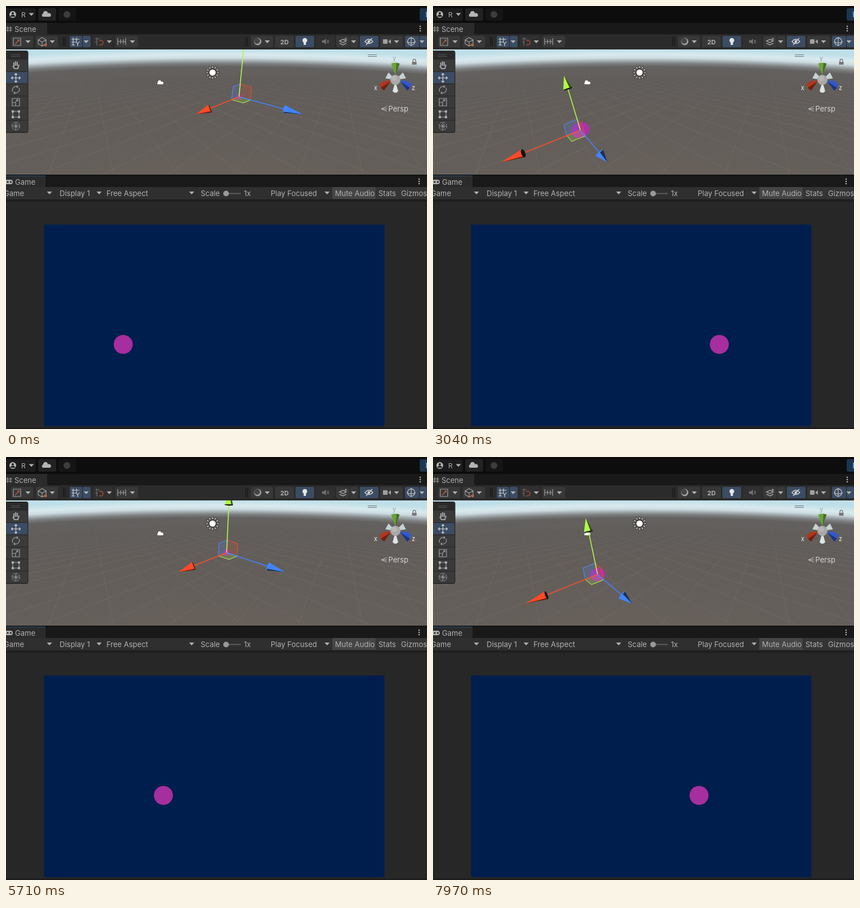
Recreate the animation shown at these times as an HTML page. Size 746 px wide and 750 px high, loop 8 s.

```html
<!DOCTYPE html>
<html lang="en">
<head>
<meta charset="utf-8">
<title>Oscillating disc</title>
<style>
  html, body { margin: 0; width: 100%; height: 100%; overflow: hidden; background: #272727; }
  svg { display: block; width: 746px; height: 750px; }
  text { font: 13px Inter, "Open Sans", sans-serif; fill: #b0b0b0; }
</style>
</head>
<body>
<svg id="stage" viewBox="0 0 746 750" xmlns="http://www.w3.org/2000/svg">
  <defs>
    <!-- curved horizon: a wide ellipse of ground under the sky -->
    <radialGradient id="sky" gradientUnits="userSpaceOnUse" cx="0" cy="0" r="1"
      gradientTransform="translate(373 300) scale(1200 230)">
      <stop offset="0" stop-color="#67605b"/>
      <stop offset=".74" stop-color="#605c59"/>
      <stop offset=".835" stop-color="#636160"/>
      <stop offset=".861" stop-color="#7b7d7e"/>
      <stop offset=".883" stop-color="#a3adb1"/>
      <stop offset=".904" stop-color="#cddce1"/>
      <stop offset=".93" stop-color="#d9eaee"/>
      <stop offset=".97" stop-color="#bfdfe8"/>
    </radialGradient>
    <linearGradient id="fade" x1="0" y1="92" x2="0" y2="190" gradientUnits="userSpaceOnUse">
      <stop offset=".1" stop-color="#000"/>
      <stop offset="1" stop-color="#fff"/>
    </linearGradient>
    <linearGradient id="shadow" x1="0" y1="0" x2="0" y2="1">
      <stop offset="0" stop-color="#1a1a1a"/>
      <stop offset="1" stop-color="#272727"/>
    </linearGradient>
    <mask id="far"><rect y="77" width="746" height="223" fill="url(#fade)"/></mask>
    <clipPath id="view"><rect y="77" width="746" height="222"/></clipPath>
  </defs>
  <g id="ui"></g>
  <g clip-path="url(#view)">
    <rect y="77" width="746" height="222" fill="url(#sky)"/>
    <path id="grid" mask="url(#far)" stroke="#98938e" stroke-opacity=".19" fill="none"/>
    <g id="icons"></g>
    <g id="gizmo"></g>
    <g id="overlay"></g>
  </g>
  <circle id="ball" cy="600" r="16.8" fill="#a62e9e"/>
</svg>
<script>
const GREY = '#a0a0a0', ACTIVE = '#3b4c63';
const el = id => document.getElementById(id);
const rect = (x, y, w, h, fill, r = 0) =>
  `<rect x="${x}" y="${y}" width="${w}" height="${h}" rx="${r}" fill="${fill}"/>`;
const text = (x, y, s, more = '') => `<text x="${x}" y="${y}" ${more}>${s}</text>`;
const disc = (x, y, r, fill) => `<circle cx="${x}" cy="${y}" r="${r}" fill="${fill}"/>`;
const line = (d, color = GREY, w = 1.2, fill = 'none') =>
  `<path d="${d}" fill="${fill}" stroke="${color}" stroke-width="${w}"/>`;
const shape = (d, fill) => `<path d="${d}" fill="${fill}"/>`;
const caret = (x, y) => shape(`M${x - 4.5} ${y - 2.5}h9l-4.5 5z`, '#b0b0b0');
const dots = (x, y) => [-4, 0, 4].map(d => disc(x, y + d, 1.3, '#b0b0b0')).join('');
const cloud = (x, y, s, c = '#b4b4b4') => shape(
  `M${x - 7 * s} ${y + 4 * s}a3.4 3.4 0 0 1 ${s} ${-6 * s}a${4 * s} ${4 * s} 0 0 1 ${8 * s} 0a${3 * s} ${3 * s} 0 0 1 ${s * 4} ${6 * s}z`, c);
const rays = (x, y, a, b, n, color, w) => line(Array.from({ length: n }, (_, i) => {
  const c = Math.cos(i * 2 * Math.PI / n), s = Math.sin(i * 2 * Math.PI / n);
  return `M${x + a * c} ${y + a * s}L${x + b * c} ${y + b * s}`;
}).join(''), color, w);

function drawPanels() {
  const button = ([x, w, fill = '#383838']) => rect(x, 53, w, 20, fill, 2);
  el('ui').innerHTML = [
    rect(0, 0, 746, 750, '#272727'),
    // top bar
    rect(0, 0, 746, 30, '#0d0d0d'),
    rect(-4, 4, 57, 22, '#1c1c1c', 3), rect(57, 4, 32, 22, '#222', 3), rect(93, 4, 31, 22, '#151515', 3),
    disc(12, 15, 6, '#b4b4b4'), disc(12, 13, 2, '#1c1c1c'), shape('M8 19a4 3.5 0 0 1 8 0z', '#1c1c1c'),
    text(27, 19.5, 'R', 'style="font-size:12px"'), caret(45, 15), cloud(72, 15, 1), disc(108, 15, 6, '#3d3d3d'),
    rect(733, 4, 14, 22, '#1d3550', 3), rect(744, 10, 2, 10, '#4c9be0'),
    // scene tab
    rect(0, 30, 746, 20, '#191919'), rect(0, 30, 73, 20, '#2b2b2b'),
    line('M3 36v10M8 36v10M0 39h11M0 43h11', GREY, 1.1), text(15, 45.5, 'Scene'), dots(734, 40),
    rect(0, 50, 746, 27, '#2b2b2b'),
    [[9, 39], [53, 39], [113, 22, ACTIVE], [136, 14, ACTIVE], [154, 34, '#303030'], [194, 40],
     [434, 39], [477, 33], [513, 33, ACTIVE], [549, 33, '#303030'], [585, 24], [610, 14],
     [627, 33, ACTIVE], [663, 40], [707, 25, ACTIVE], [733, 20, ACTIVE]].map(button).join(''),
    [39, 82, 142, 183, 224, 463, 616, 692, 737].map(x => caret(x, 63.5)).join(''),
    line('M102 55v16M105 55v16M425 55v16M428 55v16', '#151515', 1.2),
    line('M13 57h13v13h-13z'), line('M16 68l7-8M20 60h3v3', '#c0603f'),
    line('M57 60l7-4 7 4v7l-7 4-7-4zM57 60l7 4 7-4M64 64v7'), disc(70, 69, 2.5, '#c0603f'),
    line('M116 59h14M116 64h8M116 69h6M119 56v14M125 56v7M124 63l3 4 3-4M127 67v4', '#d0d0d0'),
    line('M158 58h8M158 64h4M161 56v14', '#707070'), line('M165 61h3a3.5 3.5 0 0 1 0 8h-3', '#8a4636', 2),
    line('M198 57v12M212 57v12M198 63h14M203 59v8M208 59v8'),
    disc(446, 63, 6.5, GREY), disc(445, 62, 5, '#444'),
    text(486, 67.5, '2D', 'style="font-size:11px;font-weight:700"'),
    disc(529.5, 61, 4.2, '#e6e6e6'), rect(527.5, 64, 4, 5, '#e6e6e6'),
    shape('M560 61h3l4-3v10l-4-3h-3z', '#707070'), line('M569 60l3 6M572 60l-3 6', '#707070'),
    line('M591 62l6-3 6 3-6 3zM591 66l6 3 6-3', GREY, 1.5), line('M602 56v5M599.5 58.5h5'),
    line('M636 63q7-8 14 0q-7 7-14 0zM638 69l11-12', '#d0d0d0', 1.5), disc(643, 63, 2.4, '#d0d0d0'),
    rect(668, 59, 8, 8, GREY, 1), shape('M677 63l5-4v8z', GREY),
    '<circle cx="718" cy="63" r="6.5" fill="none" stroke="#c0c0c0" stroke-width="1.3"/>',
    line('M718 55v16M710 63q8 5 16 0', '#c0c0c0'),
    // game tab and toolbar
    rect(0, 299, 746, 2, '#111'), rect(0, 301, 746, 20, '#191919'),
    rect(0, 301, 70, 20, '#2b2b2b'), rect(0, 300.5, 70, 1.5, '#28435a'),
    rect(-2, 308, 14, 8, '#b0b0b0', 4), disc(3, 312, 1.7, '#2b2b2b'), disc(8.5, 312, 1.7, '#2b2b2b'),
    text(16, 316.5, 'Game'), dots(732, 311),
    rect(0, 321, 746, 22, '#2f2f2f'), rect(0, 343, 746, 6, 'url(#shadow)'),
    [87, 171, 338, 577].map(x => rect(x, 321, 1, 22, '#292929')).join(''),
    rect(578, 321, 77, 21, '#454545'), rect(656, 321, 40, 21, '#353535'), rect(697, 321, 49, 21, '#353535'),
    [[-4, 'Game'], [95, 'Display 1'], [178, 'Free Aspect'], [345, 'Scale'], [421.5, '1x'],
     [469, 'Play Focused'], [583, 'Mute Audio'], [660, 'Stats'], [700, 'Gizmos']]
      .map(([x, s]) => text(x, 336.5, s)).join(''),
    [77, 165, 329, 569].map(x => caret(x, 331.5)).join(''),
    rect(385, 331.5, 31, 2, '#5e5e5e'), disc(390, 332.5, 5, '#999'),
    rect(67.5, 387.5, 603, 357.5, '#001e4d', 1), rect(0, 747.5, 746, 2.5, '#1c1c1c')
  ].join('');
}

function drawScene() {
  let d = '';
  for (let i = -24; i <= 24; i++)
    for (const vx of [592, 150]) d += `M${vx} 91L${vx + i * 115 + 40} 299`;
  el('grid').setAttribute('d', d);
  el('icons').innerHTML = disc(366, 118, 7, '#33302e') + disc(366, 118, 5.6, '#fff') +
    rays(366, 118, 7.5, 12.5, 12, '#33302e', 2.8) + rays(366, 118, 8, 11.5, 12, '#fff', 1.2) +
    cloud(273.5, 136, .7, '#fff');

  const lobe = (dx, dy, fill) => {
    const n = Math.hypot(dx, dy), px = -dy / n * 6, py = dx / n * 6;
    return shape(`M690 131L${690 + dx + px} ${131 + dy + py}L${690 + dx - px} ${131 + dy - py}z`, fill);
  };
  el('overlay').innerHTML = [
    rect(-4, 79, 43.5, 146, '#2a2a2a', 4), rect(0, 95, 38, 128, '#3a3a3a'), rect(0, 117, 38, 20, ACTIVE),
    line('M9 86.5h16M9 89.5h16', '#555'), line('M641 86.5h16M641 89.5h16', '#6d7476'),
    line('M0 116.5h38M0 138h38M0 159.5h38M0 181h38M0 202.5h38', '#272727'),
    line('M12 106l3 5h6l2-7M14 107v-7M17 106v-8M20 106v-7', GREY, 2.2),
    line('M10 127.5h15M17.5 120v15M12 125l-2.5 2.5 2.5 2.5M23 125l2.5 2.5-2.5 2.5M15 122l2.5-2.5 2.5 2.5M15 133l2.5 2.5 2.5-2.5', '#d0d0d0'),
    line('M12 152a6.5 6.5 0 0 1 8-9M23 145a6.5 6.5 0 0 1-8 9M19 141l2 2-2 2M16 156l-2-2 2-2'),
    line('M11 164h13v13h-13zM11 171h6v6M17 170l4-4M18 166h3v3'),
    line('M12 187h11v10h-11z'), [[12, 187], [23, 187], [12, 197], [23, 197]]
      .map(([x, y]) => rect(x - 2, y - 2, 4, 4, '#aaa')).join(''),
    `<circle cx="17.5" cy="213" r="7" fill="none" stroke="${GREY}" stroke-dasharray="4 1.5"/>`,
    line('M11 213h13M17.5 206.5v13M14 209.5l7 7M21 209.5l-7 7', GREY, 1),
    lobe(-15, -8, '#c5d2d4'), lobe(16, -8, '#c5d2d4'),
    shape('M682.5 102q7.5-3 15 0L690 123z', '#6aa33a'), shape('M692 101l5.5 1L690 123z', '#466f28'),
    shape('M661 140l8-7 13-1-12 18z', '#b23620'), shape('M664 145l17-11-11 16z', '#70210f'),
    shape('M719 139l-7-6-14-1 13 18z', '#3258cc'), shape('M716 145l-17-11 12 16z', '#1c3484'),
    shape('M685 151q5 6 10 0L690 134z', '#dde4e4'),
    disc(690, 131, 9, '#a9a9a9'), disc(688, 128, 5, '#b7b7b7'),
    text(685, 97, 'y', 'style="font-size:11px;fill:#99a6a6"'),
    text(652, 149, 'x', 'style="font-size:11px;fill:#eee"'), text(719, 149, 'z', 'style="font-size:11px;fill:#eee"'),
    line('M721 99v-2a2.5 2.5 0 0 1 5 0v2', '#777', 1.3), rect(719.5, 99, 8, 5, '#777'),
    line('M675 178l-10 4.5 10 4M665 182.5h10', '#c4c4c4', 1),
    text(677.5, 187, 'Persp', 'style="fill:#d4d4d4"')
  ].join('');
}

const mix = (o, ...terms) => terms.reduce(([x, y], [v, k]) => [x + v[0] * k, y + v[1] * k], o);
const path = pts => 'M' + pts.map(p => p.map(n => n.toFixed(1)).join(' ')).join('L') + 'z';

// A shaft and a cone; `shade` is the dark share of its width, `open` how far its base faces the viewer.
function arrow(o, arm, { color, base, half, shade, side, open, behind }) {
  const len = Math.hypot(...arm), dir = arm.map(v => v / len), normal = [-dir[1] * side, dir[0] * side];
  const b = mix(o, [arm, base]), tip = mix(o, [arm, 1]);
  const across = k => mix(b, [normal, half * k]);
  const angle = Math.atan2(dir[1], dir[0]) * 180 / Math.PI;
  const rim = `<ellipse rx="${open}" ry="${half}" transform="translate(${b}) rotate(${angle})"
    fill="${behind ? color : '#15140f'}"/>`;
  return line(path([o, b]), color, 1.6) + (behind ? rim : '') +
    shape(path([across(1), tip, across(-1)]), color) +
    shape(path([across(1), tip, across(1 - 2 * shade)]), '#15140fc0') + (behind ? '' : rim);
}

// Perspective of the movement handles; k grows as the disc nears the viewer.
function drawGizmo(x) {
  const u = x - 207.5, k = 1 / (1 - .001528 * u);
  const o = [(413 - .9054 * u) * k, (161 - .139 * u) * k];
  const red = [-76 * k, 30.7 * k], green = [57.7 - 47 * k, -134.5 + 20.6 * k], blue = [190 - 77 * k, 30.7 * k];
  const r = [red, .17], g = [green, .2], b = [blue, .18];
  const quad = (p, q, color) => `<path d="${path([o, mix(o, p), mix(o, p, q), mix(o, q)])}"
    fill="${color}" fill-opacity=".2" stroke="${color}" stroke-width="1.1"/>`;
  const size = 4.8 * k * k, shade = .2 + .12 * (k - 1);
  el('gizmo').innerHTML =
    `<ellipse rx="${size}" ry="${size * (1.18 - .18 * k)}" transform="translate(${o}) rotate(-22)" fill="#ae2fae"/>` +
    quad(g, b, '#e0502c') + quad(r, b, '#a5e24e') + quad(r, g, '#5585f0') +
    arrow(o, blue, { color: '#4284ff', base: .71, half: 5 + 2 * k, shade: shade * k * .8, side: k > 1.4 ? -1 : 1, open: 2, behind: true }) +
    arrow(o, green, { color: '#b0fa46', base: .76, half: 6 + 1.4 * k, shade, side: 1, open: 1.2 }) +
    arrow(o, red, { color: '#ff4a26', base: .62 + .055 * k, half: 7.5, shade: .15, side: -1, open: Math.max(.6, (k - 1.4) * 8) });
}

// Swing: [step, phase in radians], straight lines between.
const swing = [[0, -.318], [14, 3.04], [32, 6.828], [56, 13.24], [69, 14.67], [71, 15.52],
               [94, 24.6], [109, 31.9], [115, 33.64]];
const LOOP = 8000, STEP = 69.2;

function phaseAt(step) {
  const i = Math.max(1, swing.findIndex(([s]) => s >= step));
  const [s0, p0] = swing[i - 1], [s1, p1] = swing[i];
  return p0 + (p1 - p0) * (step - s0) / (s1 - s0);
}

let shown = -1;
function render(now) {
  const step = Math.min(115, Math.floor((now % LOOP + 30) / STEP));
  if (step !== shown) {
    shown = step;
    const x = 368.5 - 169.3 * Math.cos(phaseAt(step));
    el('ball').setAttribute('cx', x.toFixed(2));
    drawGizmo(x);
  }
  requestAnimationFrame(render);
}

drawPanels();
drawScene();
render(performance.now());
</script>
</body>
</html>
```
